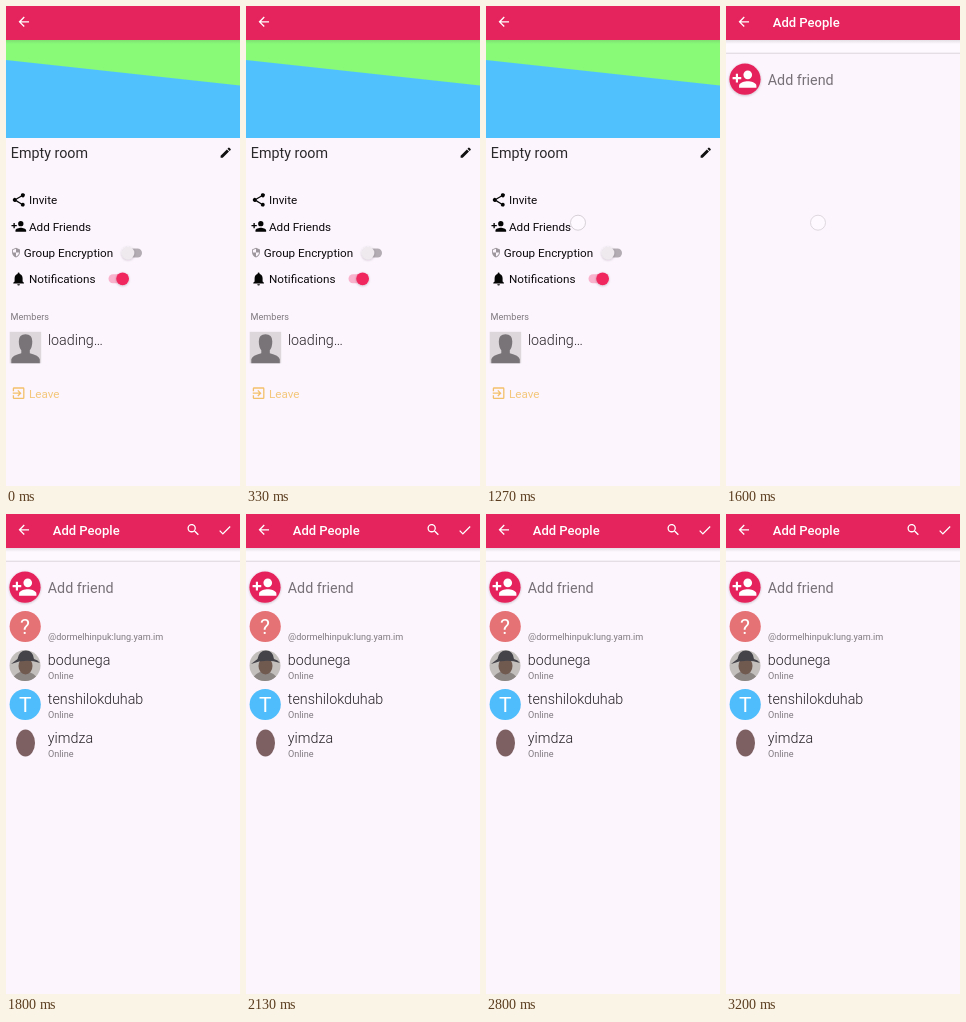
Recreate the animation shown at these times as an HTML page. Size 234 by 480 pixels, loop 3940 ms.

```html
<!DOCTYPE html>
<html lang="en">
<head>
<meta charset="utf-8">
<title>Add people to a room</title>
<style>
  html, body { margin: 0; width: 100%; height: 100%; overflow: hidden; background: #fcf5fd; }
  svg { display: block; width: 100%; height: 100%; }
  text { font-family: Roboto, "Noto Sans", sans-serif; fill: #0c090c; }
  .title { font-size: 13px; font-weight: 500; fill: #fff; }
  .head { font-size: 14.3px; fill: #2b282b; }
  .name { font-size: 14.3px; font-weight: 300; fill: #262226; }
  .row { font-size: 11.7px; }
  .small { font-size: 9.1px; fill: #807a80; }
  .letter { font-size: 21px; fill: #fff; text-anchor: middle; }
  .muted { fill: #777177; }
</style>
</head>
<body>
<svg viewBox="0 0 234 480" preserveAspectRatio="none">
  <defs>
    <linearGradient id="fall" x2="0" y2="1">
      <stop offset="0" stop-color="#403040" stop-opacity=".13"/>
      <stop offset="1" stop-color="#403040" stop-opacity="0"/>
    </linearGradient>
    <filter id="drop" x="-30%" y="-30%" width="160%" height="160%">
      <feDropShadow dx="0" dy=".7" stdDeviation=".8" flood-color="#302030" flood-opacity=".28"/>
    </filter>
    <clipPath id="round"><circle cx="19" cy="151.5" r="15.5"/></clipPath>
  </defs>
  <rect width="234" height="480" fill="#fcf5fd"/>

  <g id="room">
    <rect y="33" width="234" height="99" fill="#51c1fe"/>
    <path d="M0 33H234V79.5L0 54Z" fill="#88fa78"/>
    <text class="head" x="4.8" y="152.2">Empty room</text>
    <text class="row" x="23" y="198.2">Invite</text>
    <text class="row" x="23" y="224.5">Add Friends</text>
    <text class="row" x="17.7" y="250.8">Group Encryption</text>
    <text class="row" x="23" y="277.2">Notifications</text>
    <rect x="117" y="242.5" width="19" height="9" rx="4.5" fill="#b3adb3"/>
    <circle cx="122" cy="247" r="6.3" fill="#eeeaee" filter="url(#drop)"/>
    <rect x="102.5" y="268.3" width="19" height="9" rx="4.5" fill="#f9b3cc"/>
    <circle cx="116.6" cy="272.8" r="6.4" fill="#f0265f" filter="url(#drop)"/>
    <text class="small" x="4.6" y="314.2">Members</text>
    <rect x="3.7" y="325.8" width="31.5" height="31.5" fill="#ddd7dc"/>
    <path d="M5.3 357.3V353.3Q6.300 349.300 15.300 347.300V344.300Q12.800 341.300 12.800 335.300Q12.800 328.300 19.500 328.300T26.300 335.300Q26.300 341.300 23.800 344.300V347.300Q32.800 349.300 33.800 353.300V357.300Z" fill="#797477"/>
    <text class="name" x="41.900" y="339.200">loading…</text>
    <text class="row" x="23" y="391.800" style="fill:#f3c77c">Leave</text>
  </g>

  <g id="people">
    <rect y="33" width="234" height="14" fill="#fdf9fe"/>
    <rect y="46.700" width="234" height="1" fill="#dcd6dc"/>
    <circle cx="19" cy="73.200" r="15.600" fill="#e5235c" filter="url(#drop)"/>
    <text class="head muted" x="41.800" y="79.200">Add friend</text>
  </g>

  <g id="list">
    <circle cx="19.200" cy="112.500" r="15.600" fill="#e57275"/>
    <text class="letter" x="19" y="120">?</text>
    <text class="small" x="42" y="125.700">@dormelhinpuk:lung.yam.im</text>
    <g clip-path="url(#round)">
      <rect x="3" y="135" width="32" height="33" fill="#c3bfbd"/>
      <path d="M5 168Q7 159 18 157Q30 158 33 168Z" fill="#8b8583"/>
      <ellipse cx="19.500" cy="152" rx="7" ry="8.500" fill="#705a50"/>
      <path d="M5 150Q9 147 11.500 145Q13 136.500 20 136.500T28 145Q32 146 34 149Q20 144 5 150Z" fill="#45434a"/>
    </g>
    <text class="name" x="41.800" y="151.200">bodunega</text>
    <circle cx="19.200" cy="190.500" r="15.600" fill="#4fbdfb"/>
    <text class="letter" x="19.200" y="198">T</text>
    <text class="name" x="41.800" y="190.200">tenshilokduhab</text>
    <ellipse cx="19.500" cy="229" rx="9.500" ry="13.500" fill="#7d6062"/>
    <text class="name" x="41.800" y="229.200">yimdza</text>
  </g>

  <rect width="234" height="34" fill="#e5235c"/>
  <rect y="34" width="234" height="4" fill="url(#fall)"/>
  <g id="bar"></g>
  <text class="title" id="title" x="46.800" y="20.700">Add People</text>
  <circle id="touch" cx="92" cy="216.700" r="7.500" fill="#fff" fill-opacity=".45" stroke="#cdc7cd" stroke-width=".8"/>
</svg>
<script>
const NS = "http://www.w3.org/2000/svg";
const $ = id => document.getElementById(id);

// Icon outlines on a 24-unit grid
const shapes = {
  back: "M20 11H7.83l5.59-5.59L12 4l-8 8 8 8 1.41-1.41L7.83 13H20z",
  search: "M15.5 14h-.79l-.28-.27A6.5 6.5 0 1 0 13.73 14.43l.27.28v.79l5 5L20.500 19zM9.500 14A4.500 4.500 0 1 1 9.500 5a4.500 4.500 0 0 1 0 9z",
  check: "M9 16.170L4.830 12l-1.420 1.410L9 19 21 7l-1.410-1.410z",
  edit: "M3 17.250V21h3.750L17.810 9.940l-3.750-3.750zM20.710 7.040a1 1 0 0 0 0-1.410l-2.340-2.340a1 1 0 0 0-1.410 0l-1.830 1.830 3.750 3.750z",
  share: "M15 5a3 3 0 1 1 .96 2.200L8.910 11.300a3 3 0 0 1 0 1.400l7.120 4.160a2.920 2.920 0 1 1-.95 1.560L7.960 14.260a3 3 0 1 1 0-4.460l7.130-4.150z",
  add: "M15 12a4 4 0 1 0 0-8 4 4 0 0 0 0 8zM6 10V7H4v3H1v2h3v3h2v-3h3v-2zM15 14c-2.670 0-8 1.340-8 4v2h16v-2c0-2.660-5.330-4-8-4z",
  shield: "M12 1L3 5v6c0 5.550 3.840 10.740 9 12 5.160-1.260 9-6.450 9-12V5zM12 12h7c-.53 4.120-3.280 7.790-7 8.940V12H5V6.300l7-3.110z",
  bell: "M12 22a2 2 0 0 0 2-2h-4a2 2 0 0 0 2 2zM18 16v-5c0-3.070-1.640-5.640-4.500-6.320V4a1.500 1.500 0 0 0-3 0v.68C7.630 5.360 6 7.920 6 11v5l-2 2v1h16v-1z",
  leave: "M10.090 15.590L11.500 17l5-5-5-5-1.410 1.410L12.670 11H3v2h9.670zM19 3H5a2 2 0 0 0-2 2v4h2V5h14v14H5v-4H3v4a2 2 0 0 0 2 2h14a2 2 0 0 0 2-2V5a2 2 0 0 0-2-2z"
};

function icon(parent, shape, x, y, color, size = 15.6) {
  const path = document.createElementNS(NS, "path");
  path.setAttribute("d", shapes[shape]);
  path.setAttribute("fill", color);
  path.setAttribute("fill-rule", "evenodd");
  path.setAttribute("transform", `translate(${x} ${y}) scale(${size / 24}) translate(-12 -12)`);
  $(parent).append(path);
  return path;
}

function label(x, y, text) {
  const node = document.createElementNS(NS, "text");
  node.setAttribute("class", "small");
  node.setAttribute("x", x);
  node.setAttribute("y", y);
  node.textContent = text;
  $("list").append(node);
}

icon("bar", "back", 17.8, 15.8, "#fff");
const actions = [icon("bar", "search", 187.3, 15.8, "#fff"), icon("bar", "check", 218.8, 16.2, "#fff")];
icon("room", "edit", 219.7, 146.7, "#111", 13.6);
icon("room", "share", 12.8, 193.9, "#050505", 16);
icon("room", "add", 12.8, 220.3, "#050505", 16);
icon("room", "shield", 10, 246.6, "#9d979d", 10.6);
icon("room", "bell", 12.6, 272.8, "#050505", 16);
icon("room", "leave", 12.6, 387.2, "#f3c06a");
icon("people", "add", 18.5, 73.2, "#fff", 26);
for (const y of [164.7, 203.8, 242.8]) label(42, y, "Online");

const LOOP = 3940;
// [start ms, screen, list loaded, touch opacity]
const steps = [
  [0, "room", false, 0],
  [1200, "room", false, 1],
  [1600, "people", false, 0.8],
  [1670, "people", true, 0]
];
const show = (node, on) => { node.style.display = on ? "" : "none"; };

function draw(now) {
  const t = now % LOOP;
  const [, screen, loaded, touch] = steps.filter(s => s[0] <= t).pop();
  show($("room"), screen === "room");
  show($("people"), screen === "people");
  show($("title"), screen === "people");
  show($("list"), loaded);
  actions.forEach(a => show(a, loaded));
  $("touch").style.opacity = touch;
}

const start = performance.now();
function tick() {
  draw(performance.now() - start);
  requestAnimationFrame(tick);
}
tick();
</script>
</body>
</html>
```
